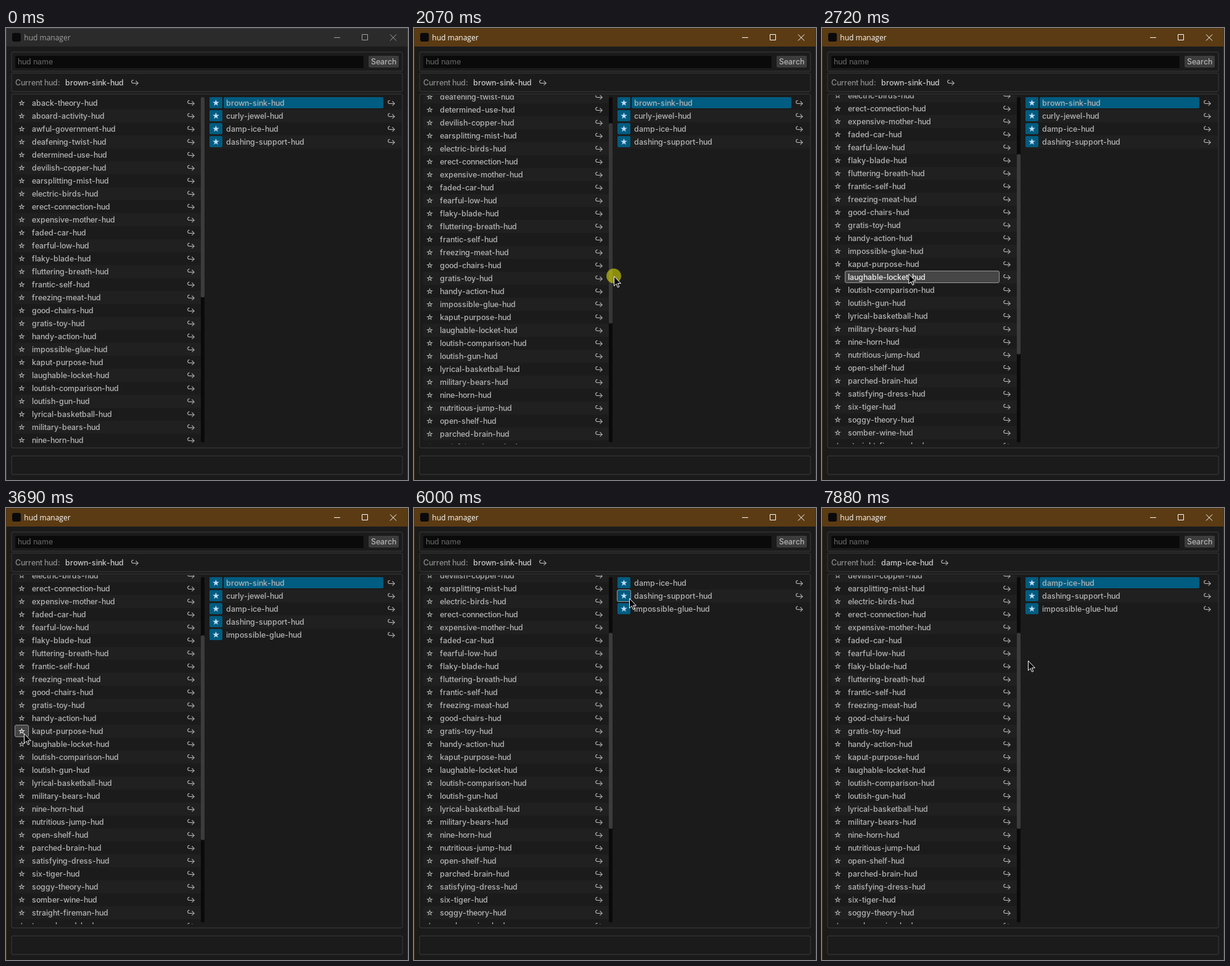
An HTML page that plays this animation: 652x732 px, repeating every 8 s.

```html
<!DOCTYPE html>
<html lang="en">
<head>
<meta charset="utf-8">
<title>hud manager</title>
<style>
  html, body { margin: 0; width: 100%; height: 100%; overflow: hidden; background: #1b1b1b; }
  svg { display: block; }
  text { font: 500 12.4px Inter, "DejaVu Sans", sans-serif; white-space: pre; }
  .title { font: 12px "Open Sans", "Noto Sans", sans-serif; }
  .icon { text-anchor: middle; }
  .panel { fill: none; stroke: #3c3c3c; }
  .line { fill: none; }
</style>
</head>
<body>
<svg id="stage" width="652" height="732" viewBox="0 0 652 732">
  <defs>
    <clipPath id="listClip"><rect x="10" y="109" width="632" height="565"/></clipPath>
  </defs>
  <rect width="652" height="732" fill="#1b1b1b"/>
  <g id="titleBar"></g>
  <rect class="panel" x="9" y="39" width="634" height="31" rx="2"/>
  <rect class="panel" x="9" y="73" width="634" height="30" rx="2"/>
  <rect class="panel" x="9" y="107" width="634" height="573" rx="2"/>
  <rect class="panel" x="9" y="693" width="634" height="30" rx="2"/>
  <rect x="15" y="45" width="565" height="20" rx="2" fill="#0a0a0a"/>
  <rect x="588" y="45" width="49" height="19" rx="2" fill="#3c3c3c"/>
  <g id="captions"></g>
  <g id="lists" clip-path="url(#listClip)"></g>
  <rect x="316" y="112" width="6" height="559" rx="2" fill="#0a0a0a"/>
  <rect id="thumb" x="316" width="6" rx="2"/>
  <circle id="press" r="12" fill="#ff0" fill-opacity=".5"/>
  <path id="cursor" d="M.5 .5v15.6l3.6-3.4 2.4 5.7 2.3-1-2.4-5.5h5z" fill="#000" stroke="#fff"/>
</svg>
<script>
const LOOP = 8000, STEP = 40, ROW = 21, TOP = 111, VIEW = 559, UNSEEN_ROWS = 10;
const SCROLLED = 159, GRAB = { x: 324, y: 359 };
const ENTRY = { time: 410, x: 582, y: 706 };
const INK = "#b4b4b4", BRIGHT = "#f0f0f0", SELECTED_INK = "#c0deff", SELECTED = "#005c80";

const names = `aback-theory aboard-activity awful-government brown-sink curly-jewel damp-ice
  dashing-support deafening-twist determined-use devilish-copper earsplitting-mist electric-birds
  erect-connection expensive-mother faded-car fearful-low flaky-blade fluttering-breath frantic-self
  freezing-meat good-chairs gratis-toy handy-action impossible-glue kaput-purpose laughable-locket
  loutish-comparison loutish-gun lyrical-basketball military-bears nine-horn nutritious-jump open-shelf
  parched-brain satisfying-dress six-tiger soggy-theory somber-wine straight-fireman tense-bread`
  .split(/\s+/);

// The session: pointer moves, held presses and what each press changes.
const moves = [], presses = [], toggles = [];
const move = (from, to, x, y) => moves.push({ from, to, x, y });
const press = (from, to, name) => {
  presses.push({ from, to });
  if (name) toggles.push({ time: to, name });
};

move(410, 610, 405, 453);
move(900, 1300, 326, 356);
move(1550, 1790, GRAB.x, GRAB.y);
press(1950, 2430);
move(1950, 2400, GRAB.x, 451.2);
move(2640, 2840, 37, 368);
move(3090, 3250, 29, 365);
press(3410, 3570, "impossible-glue");
move(4060, 4700, 363, 123);
move(4700, 4900, 344, 123);
press(4940, 5060, "brown-sink");
press(5390, 5470, "curly-jewel");
move(5960, 6000, 349, 146);
move(6000, 6120, 362, 192);
move(6290, 6450, 423, 131);
press(6660, 7110);
move(7070, 7110, 335, 153);
move(7520, 7880, 334, 247);

const $ = id => document.getElementById(id);
const within = (v, a, b) => v >= a && v < b;
const easeOut = u => 1 - (1 - u) ** 2;

function pointerAt(time) {
  if (time < ENTRY.time) return null;
  let { x, y } = ENTRY;
  for (const m of moves) {
    if (time < m.from) break;
    const elapsed = Math.floor((time - m.from) / STEP) * STEP;
    const p = time >= m.to ? 1 : easeOut(elapsed / (m.to - m.from));
    x += (m.x - x) * p;
    y += (m.y - y) * p;
  }
  return { x, y };
}

function favouritesAt(time) {
  const set = new Set(["brown-sink", "curly-jewel", "damp-ice", "dashing-support"]);
  for (const { time: at, name } of toggles) {
    if (time >= at && !set.delete(name)) set.add(name);
  }
  return [...set];
}

// The interface places every glyph on a whole pixel.
const meter = document.createElement("canvas").getContext("2d");
meter.font = "12.4px Inter, sans-serif";
const advances = {};
const advance = ch => advances[ch] ??= Math.round(meter.measureText(ch).width);
const widthOf = text => [...text].reduce((sum, ch) => sum + advance(ch), 0);

function label(x, y, text, color) {
  const xs = [...text].map((_, i) => x + widthOf(text.slice(0, i)));
  return `<text x="${xs.join(" ")}" y="${y}" fill="${color}">${text}</text>`;
}

const icon = (cx, y, glyph, color) =>
  `<text class="icon" x="${cx}" y="${y}" fill="${color}">${glyph}</text>`;

function button(x, y, width, on, hot) {
  if (!on && !hot) return "";
  const fill = on ? SELECTED : "#464646";
  return hot
    ? `<rect x="${x - .5}" y="${y + .5}" width="${width + 1}" height="19" rx="2.5" fill="${fill}" stroke="#969696"/>`
    : `<rect x="${x}" y="${y + 1}" width="${width}" height="18" rx="2" fill="${fill}"/>`;
}

function drawList(items, { x, labelWidth, stripeWidth, starred }, offset, selected, hover) {
  const labelX = x + 23, arrowX = labelX + labelWidth + 13;
  return items.map((name, i) => {
    const y = TOP + i * ROW - offset;
    if (y < 80 || y > 680) return "";
    const over = (left, width) =>
      hover && within(hover.y, y, y + ROW) && within(hover.x, left, left + width);
    const ink = hot => hot ? BRIGHT : INK;
    const hotStar = over(x, 21), hotLabel = over(labelX, labelWidth), hotArrow = over(arrowX - 9, 18);
    return (i % 2 ? `<rect x="${x}" y="${y}" width="${stripeWidth}" height="${ROW}" fill="#202020"/>` : "")
      + button(x, y, 21, starred, hotStar)
      + icon(x + 10.5, y + 15, starred ? "★" : "☆", starred ? SELECTED_INK : ink(hotStar))
      + button(labelX, y, labelWidth, name === selected, hotLabel)
      + label(x + 27, y + 15, name + "-hud", ink(hotLabel))
      + icon(arrowX, y + 15, "↪", ink(hotArrow));
  }).join("");
}

const leftList = { x: 15, labelWidth: 249, stripeWidth: 301, starred: false };
const rightList = { x: 330, labelWidth: 259, stripeWidth: 312, starred: true };

function titleBar(active) {
  const ink = active ? "#fff" : "#a0a0a0";
  return `<rect width="652" height="30" fill="${active ? "#5b3b13" : "#2b2b2c"}"/>
    <path class="line" stroke="${active ? "#4a3216" : "#42424a"}" d="M.5 732V.5h651V732"/>
    <rect x="10" y="8" width="14" height="14" rx="3" fill="#0a0a0c"/>
    <text class="title" x="29.3" y="20" fill="${ink}">hud manager</text>
    <path class="line" stroke="${ink}" d="M532 15.5h10M577.5 10.5h9v9h-9z"/>
    <path class="line" stroke="${ink}" d="M623 10.5l10 10m0-10l-10 10"/>`;
}

function captions(selected) {
  const current = selected + "-hud";
  return label(19, 59, "hud name", "#5c5c5c")
    + label(592, 59, "Search", INK)
    + label(15, 93, "Current hud:", "#8c8c8c")
    + label(96, 93, current, "#c8c8c8")
    + icon(96 + widthOf(current) + 18, 93, "↪", INK);
}

const drawn = {};
function fill(id, markup) {
  if (drawn[id] !== markup) $(id).innerHTML = drawn[id] = markup;
}

function place(id, point) {
  $(id).style.display = point ? "" : "none";
  if (point) $(id).setAttribute("transform", `translate(${point.x} ${point.y})`);
}

function render(t) {
  const pointer = pointerAt(t);
  const pressed = presses.some(p => within(t, p.from, p.to));
  const active = t >= presses[0].from;
  const dragging = pressed && t < presses[0].to;
  const favourites = favouritesAt(t);
  const others = names.filter(n => !favourites.includes(n));
  const selected = t < 6780 ? "brown-sink" : "damp-ice";

  const total = (others.length + UNSEEN_ROWS) * ROW - 2;
  const offset = !active ? 0
    : dragging ? Math.round((pointer.y - GRAB.y) * total / VIEW) : SCROLLED;
  const thumbY = 112 + offset * VIEW / total, thumbHeight = VIEW * VIEW / total;
  const overThumb = pointer && within(pointer.x, 316, 324.5)
    && within(pointer.y, thumbY, thumbY + thumbHeight);

  // The window repaints its hover state late after the last click.
  const hover = dragging ? null : within(t, 7110, 7560) ? pointerAt(7100) : pointer;

  fill("titleBar", titleBar(active));
  fill("captions", captions(selected));
  fill("lists",
    drawList(others, leftList, offset, selected, hover) +
    drawList(favourites, rightList, 0, selected, hover));

  const thumb = $("thumb");
  thumb.setAttribute("y", thumbY.toFixed(1));
  thumb.setAttribute("height", thumbHeight.toFixed(1));
  thumb.setAttribute("fill", dragging ? "#373737" : overThumb ? "#464646" : "#3c3c3c");
  place("press", pressed && pointer);
  place("cursor", pointer);
}

const began = performance.now();
function tick() {
  render((performance.now() - began) % LOOP);
  requestAnimationFrame(tick);
}
tick();
</script>
</body>
</html>
```
